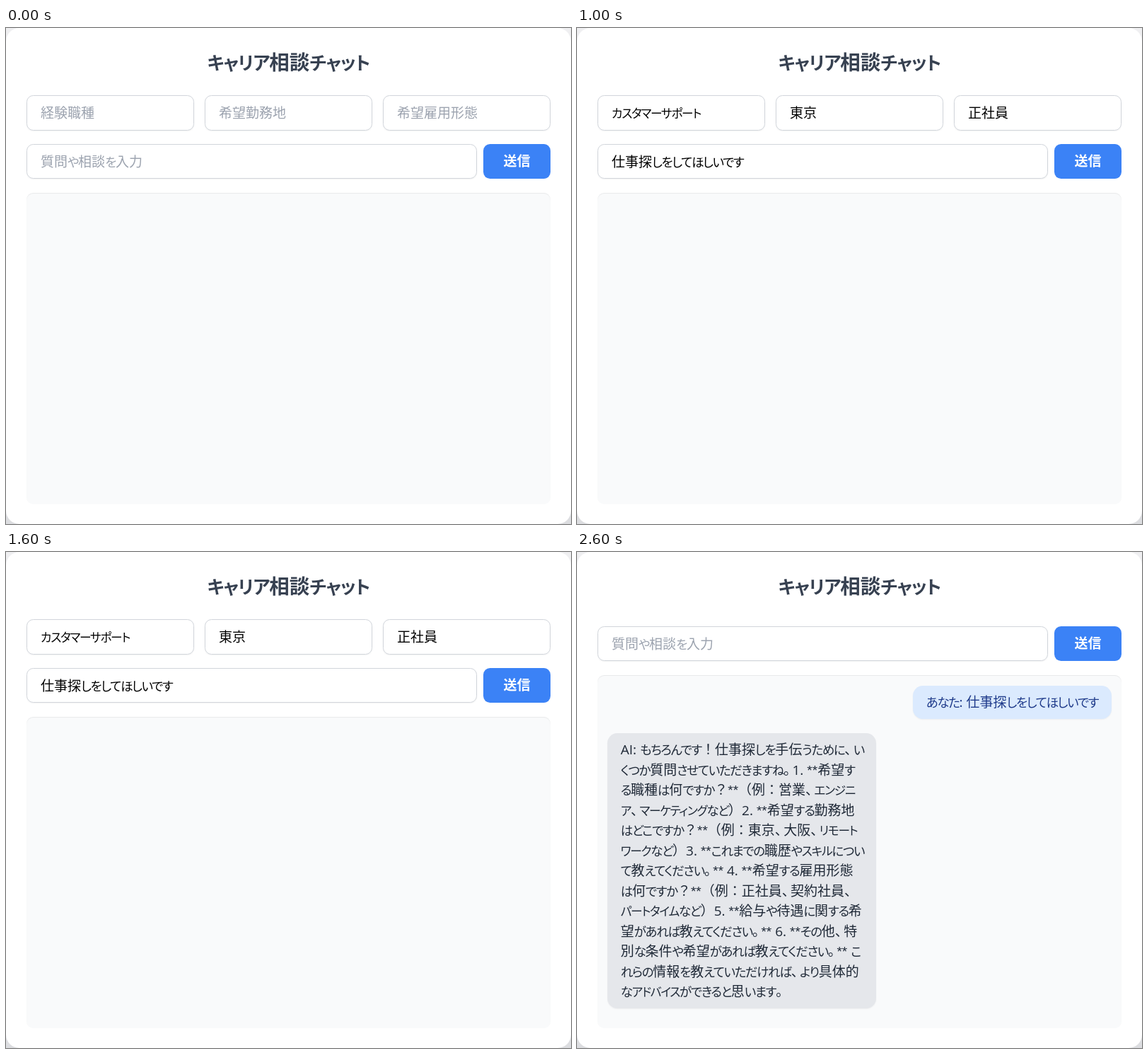
Recreate the animation shown at these times as an HTML page. Size 799 by 701 pixels, loop 3000 ms.

```html
<!DOCTYPE html>
<html lang="ja">
<head>
<meta charset="utf-8">
<title>キャリア相談チャット</title>
<style>
  html, body { margin: 0; width: 100%; height: 100%; overflow: hidden; }
  body {
    background: linear-gradient(#efeff1, #dcdde0);
    font: 19px/28.5px "Open Sans", "Noto Sans CJK JP", sans-serif;
  }
  #card { position: relative; width: 799px; height: 701px; border-radius: 19px; background: #fff; overflow: hidden; }
  #card > *, .bubble { position: absolute; box-sizing: border-box; white-space: nowrap; }

  h1 {
    left: 0; top: 30px; width: 100%; margin: 0; text-align: center;
    font-size: 28.5px; line-height: 36px; color: #374151;
  }
  .field {
    top: 95px; width: 237.5px; height: 49.5px; padding-left: 19.5px; line-height: 48px;
    border: 1px solid #d1d5db; border-radius: 9.5px; box-shadow: 0 1px 2px #0000000d; color: #000;
  }
  .empty { color: #9ca3af; }
  #question { left: 28.5px; width: 637px; }
  #send {
    left: 675px; width: 95px; height: 49.5px; line-height: 49.5px; text-align: center;
    border-radius: 9.5px; background: #3b82f6; color: #fff; font-weight: 600;
  }
  #log {
    left: 28.5px; width: 741.5px; bottom: 28px; border-radius: 9.5px;
    background: #f9fafb; box-shadow: inset 0 1px 1px #00000012;
  }
  .bubble { padding: 9.5px 19px; border-radius: 14.25px; box-shadow: 0 1px 2px #0000000d; }
  .bubble div { height: 28.5px; }
  .user { right: 14.25px; top: 15px; width: 281px; background: #dbeafe; color: #1e3a8a; }
  .bot { left: 14.25px; top: 82px; width: 380px; background: #e5e7eb; color: #1f2937; }

  /* compact Japanese interface spacing */
  .hira, .kata { font-feature-settings: "palt"; letter-spacing: -.075em; }
  .hira { font-size: .92em; }
  .kata { font-size: .88em; }
  h1 .kata { font-size: .9em; letter-spacing: -.034em; }
  .stop { letter-spacing: -.35em; }
  .star { font-family: "Liberation Sans", sans-serif; }
</style>
</head>
<body>
<div id="card"></div>
<script>
const card = document.getElementById('card');

const profile = [
  ['経験職種', 'カスタマーサポート'],
  ['希望勤務地', '東京'],
  ['希望雇用形態', '正社員'],
];
const prompt = '質問や相談を入力';
const request = '仕事探しをしてほしいです';
const reply = [
  'AI: もちろんです！仕事探しを手伝うために、い',
  'くつか質問させていただきますね。1. **希望す',
  'る職種は何ですか？**（例：営業、エンジニ',
  'ア、マーケティングなど）2. **希望する勤務地',
  'はどこですか？**（例：東京、大阪、リモート',
  'ワークなど）3. **これまでの職歴やスキルについ',
  'て教えてください。** 4. **希望する雇用形態',
  'は何ですか？**（例：正社員、契約社員、',
  'パートタイムなど）5. **給与や待遇に関する希',
  '望があれば教えてください。** 6. **その他、特',
  '別な条件や希望があれば教えてください。** こ',
  'れらの情報を教えていただければ、より具体的',
  'なアドバイスができると思います。',
];

const scripts = /(?<hira>[ぁ-ゖ]+)|(?<kata>[ァ-ヺー]+)|(?<stop>[、。]+)|(?<star>\*+)/g;
const typeset = text => text.replace(scripts, (run, ...args) => {
  const groups = args.at(-1);
  const kind = Object.keys(groups).find(name => groups[name]);
  return `<span class="${kind}">${run}</span>`;
});

const field = (text, isEmpty, style, id = '') =>
  `<div ${id && `id="${id}"`} class="field ${isEmpty ? 'empty' : ''}" style="${style}">${typeset(text)}</div>`;

const bubble = (kind, lines) =>
  `<div class="bubble ${kind}">${lines.map(line => `<div>${typeset(line)}</div>`).join('')}</div>`;

// Steps: 0 = empty form, 1 = filled form, 2 = conversation
function render(step) {
  const chatting = step === 2;
  const filled = step === 1;
  const rowTop = chatting ? 104.5 : 163.5;
  const fields = profile.map(([label, value], i) =>
    field(filled ? value : label, !filled, `left:${28.5 + i * 252}px`));
  card.innerHTML = `
    <h1>${typeset('キャリア相談チャット')}</h1>
    ${chatting ? '' : fields.join('')}
    ${field(filled ? request : prompt, !filled, `top:${rowTop}px`, 'question')}
    <div id="send" style="top:${rowTop}px">送信</div>
    <div id="log" style="top:${rowTop + 69}px">
      ${chatting ? bubble('user', ['あなた: ' + request]) + bubble('bot', reply) : ''}
    </div>`;
}

let shown = -1;
function tick() {
  const step = Math.floor(performance.now() % 3000 / 1000);
  if (step !== shown) render(shown = step);
  requestAnimationFrame(tick);
}
tick();
</script>
</body>
</html>
```
